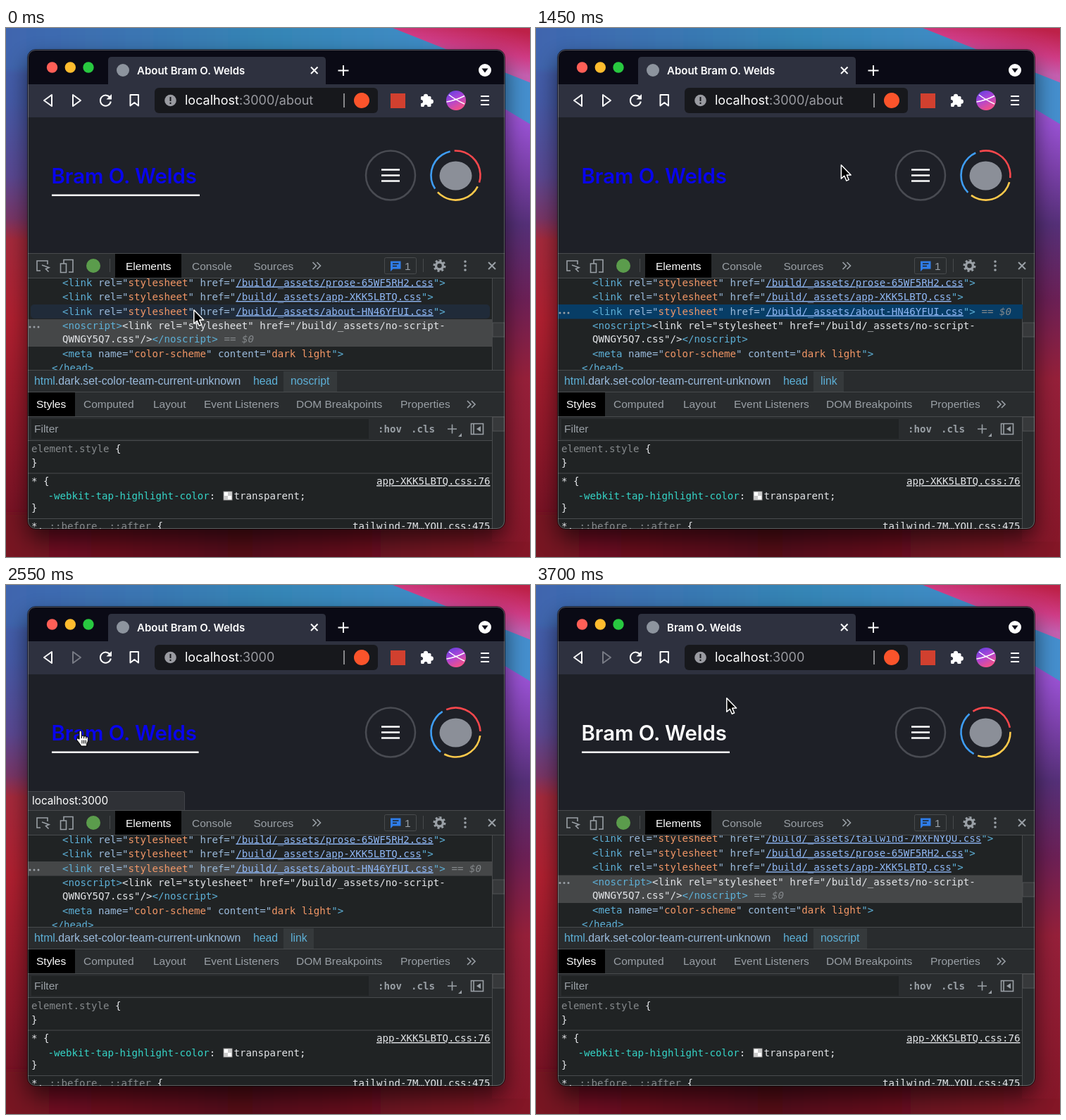
An HTML page for the animation above (3750 ms loop, 744x752 px).

```html
<!DOCTYPE html>
<html lang="en">
<head>
<meta charset="utf-8">
<title>Browser with devtools</title>
<style>
  html, body { margin: 0; width: 100%; height: 100%; overflow: hidden; background: #5a0d18; }
  svg { display: block; }
  text { white-space: pre; font-family: Inter, sans-serif; fill: #fff; }
  .dt text, text.dt { font: 15.5px "Liberation Sans", Arial, sans-serif; fill: #9aa0a6; }
  .dt text.on { fill: #fff; }
  .dt text.crumb { font-size: 15.8px; }
  text.m { font: 14.12px "DejaVu Sans Mono", monospace; fill: #e3e5e8; }
  .dt text.m { fill: #9aa0a6; font-weight: bold; }
  .tag { fill: #5db0d7; }
  .att { fill: #9bbbdc; }
  .val { fill: #f29766; }
  .url { fill: #8fb7f5; text-decoration: underline; }
  .dim { fill: #85898c; }
  text.it, .it { font-style: italic; }
  .prop { fill: #35d4c7; }
  .src { text-decoration: underline; text-anchor: end; }
  .line { fill: none; stroke: #fff; stroke-width: 2; }
  .grey { stroke: #9aa0a6; }
  .rule { stroke: #484b4d; fill: none; }
</style>
</head>
<body>
<svg width="744" height="752" viewBox="0 0 744 752">
  <defs>
    <linearGradient id="left" x2="0" y2="1">
      <stop stop-color="#4063ae"/><stop offset=".14" stop-color="#455aa6"/>
      <stop offset=".28" stop-color="#5a4892"/><stop offset=".36" stop-color="#793667"/>
      <stop offset=".4" stop-color="#a52a3c"/><stop offset=".55" stop-color="#b02030"/>
      <stop offset=".8" stop-color="#8c1729"/><stop offset="1" stop-color="#6a1022"/>
    </linearGradient>
    <linearGradient id="right" x2="0" y2="1">
      <stop stop-color="#a45ad8"/><stop offset=".06" stop-color="#9650cf"/>
      <stop offset=".16" stop-color="#7a40a8"/><stop offset=".28" stop-color="#553078"/>
      <stop offset=".45" stop-color="#6c2056"/><stop offset=".63" stop-color="#96203a"/>
      <stop offset="1" stop-color="#861729"/>
    </linearGradient>
    <linearGradient id="bottom">
      <stop stop-color="#7a1324"/><stop offset=".45" stop-color="#540d19"/><stop offset="1" stop-color="#861728"/>
    </linearGradient>
    <linearGradient id="top">
      <stop stop-color="#4063ae"/><stop offset=".5" stop-color="#3585b5"/><stop offset="1" stop-color="#4690d0"/>
    </linearGradient>
    <linearGradient id="pink" x1=".45" y1=".6" x2=".75" y2="0">
      <stop stop-color="#c460b0"/><stop offset=".4" stop-color="#cf3c86"/><stop offset="1" stop-color="#bd2148"/>
    </linearGradient>
    <linearGradient id="orb" x2=".5" y2="1">
      <stop stop-color="#5a3fe0"/><stop offset=".5" stop-color="#a945d8"/><stop offset="1" stop-color="#f0508c"/>
    </linearGradient>
    <filter id="soft" x="-.2" y="-.5" width="1.4" height="2"><feGaussianBlur stdDeviation="3"/></filter>
    <filter id="shadow" x="-.1" y="-.1" width="1.2" height="1.2"><feGaussianBlur stdDeviation="16"/></filter>
    <clipPath id="frame"><rect x="31" y="31" width="677" height="681" rx="11"/></clipPath>
    <clipPath id="tree"><rect x="31" y="356" width="660" height="130"/></clipPath>
  </defs>

  <!-- wallpaper -->
  <rect width="744" height="752" fill="url(#left)"/>
  <rect x="-20" y="690" width="784" height="80" fill="url(#bottom)" filter="url(#soft)"/>
  <path d="M-20-20H764V160H690V60H-20z" fill="url(#top)" filter="url(#soft)"/>
  <path d="M690 104L760 146V730H690z" fill="url(#right)"/>
  <path d="M544-2L750 80V-2z" fill="url(#pink)"/>
  <rect x="31" y="46" width="677" height="681" rx="12" opacity=".6" filter="url(#shadow)"/>

  <g clip-path="url(#frame)">
    <!-- tab strip -->
    <path fill="#0a0a15" d="M31 31H708V80H31z"/>
    <path fill="#2e313f" d="M145 80V46q0-5 5-5H449q5 0 5 5V80H708V127H31V80z"/>
    <circle cx="65.500" cy="56" r="7.700" fill="#ff5f57"/>
    <circle cx="91.300" cy="56" r="7.700" fill="#febc2e"/>
    <circle cx="117" cy="56" r="7.700" fill="#28c840"/>
    <circle cx="166" cy="60" r="9" fill="#8d949e"/>
    <g font-size="15" font-weight="600">
      <text data-at="0 2700" x="186" y="65.500">About Bram O. Welds</text>
      <text data-at="2700 3750" x="186" y="65.500">Bram O. Welds</text>
    </g>
    <path class="line" d="M433 55.500l9.500 9.500m0-9.500l-9.500 9.500M479 53v15m-7.500-7.500h15"/>
    <circle cx="680" cy="60" r="9" fill="#fff"/>
    <path d="M675.500 57.500h9l-4.500 6z" fill="#0a0a15"/>

    <!-- toolbar -->
    <g class="line" stroke-linejoin="round">
      <path d="M65 95V111L54 103z"/>
      <path id="forward" d="M95 95V111L106 103z"/>
      <path d="M148 99.500a7.500 7.500 0 1 0 .8 5M176.500 95h11.500v15.500l-5.700-4.500-5.800 4.500z"/>
      <path d="M674 97h12m-12 6h12m-12 6h12" stroke-width="1.800"/>
    </g>
    <path d="M150 94v7.500h-7.500z" fill="#fff"/>
    <rect x="211" y="85" width="317" height="36" rx="6" fill="#17181c"/>
    <circle cx="233.500" cy="103" r="8.300" fill="#9a9ba1"/>
    <path class="line" style="stroke:#17181c" d="M233.500 98v6m0 1.700v2.300"/>
    <text x="254" y="109" font-size="18">localhost<tspan fill="#9b9ca2">:3000<tspan data-at="0 2470">/about</tspan></tspan></text>
    <path d="M480 93v20" stroke="#c4c5c8" stroke-width="1.300"/>
    <circle cx="505" cy="103" r="11" fill="#fb542b"/>
    <rect x="546" y="93" width="21" height="21" fill="#d1402f"/>
    <g fill="#fff">
      <rect x="589" y="97" width="14.500" height="15" rx="1.500"/>
      <circle cx="596" cy="97" r="3.200"/><circle cx="603.700" cy="104.500" r="3.200"/>
    </g>
    <g fill="#2e313f"><circle cx="589.500" cy="104.500" r="2.500"/><circle cx="596" cy="111.500" r="2.500"/></g>
    <circle cx="639" cy="103" r="14" fill="url(#orb)"/>
    <path class="line" style="stroke-width:1.500" d="M625.500 105Q638 103 651 96.500M629 95q9 7 22 13"/>

    <!-- page -->
    <path fill="#1e2027" d="M31 127H708V321H31z"/>
    <text id="logo" x="64.500" y="221" font-size="29.300" font-weight="600">Bram O. Welds</text>
    <rect id="underline" y="236.500" height="2.500" fill="#fff"/>
    <circle cx="546" cy="209.500" r="35" class="line" style="stroke:#494b52;stroke-width:2.500"/>
    <path class="line" style="stroke-width:2.500" d="M533 201.500h26m-26 8h26m-26 8h26"/>
    <g id="ring" fill="none" stroke-width="2.600"></g>
    <ellipse cx="638.500" cy="210" rx="23" ry="20.500" fill="#8b8f98"/>
    <g data-at="2350 3280">
      <rect x="28" y="293.500" width="225.500" height="30" rx="3" fill="#2f3136" stroke="#424449"/>
      <text x="37" y="312" font-size="15.300">localhost:3000</text>
    </g>

    <!-- devtools bars -->
    <path fill="#202324" d="M31 320H708V712H31z"/>
    <path fill="#292c2e" d="M31 320H708V356H31zM31 487H708V587H31zM691 356h17v130h-17zM691 553h17v159h-17z"/>
    <path fill="#000" d="M155 321h94v34h-94zM31 518h67v34H31z"/>
    <path fill="#202324" d="M36 556H515v28H36z"/>
    <path class="rule" d="M31 320.500H708M31 355.500H708M31 486.500H708M31 517.500H708M31 552.500H708M31 586.500H691M690.500 356V486M690.500 553V712M147.500 328v19M592.500 328v19"/>
    <g class="dt" id="labels"></g>
    <g class="line grey" style="stroke-width:1.600">
      <path d="M49 345h-5v-14h15v5m-8 1l10 3.500-4.500 2 4 4"/>
      <path d="M82 335v-5.500h13V347h-6M77.500 335h8v12.500h-8z"/>
      <path d="M435.500 333l5 5-5 5m6-10l5 5-5 5M655 530l5 5-5 5m6-10l5 5-5 5"/>
      <path d="M685 333l10 10m0-10l-10 10" stroke-width="2"/>
      <path d="M633.500 563.500v13m-6.500-6.500h13M660.500 562.500h17v15h-17zM664 563v15"/>
      <circle cx="615.500" cy="338" r="5" stroke-width="3.500"/>
      <circle cx="615.500" cy="338" r="7.500" stroke-width="3" pathLength="16" stroke-dasharray="1"/>
    </g>
    <path fill="#9aa0a6" d="M674 566v8l-6-4zM647 576v5h-5z"/>
    <circle cx="124" cy="338" r="10" fill="#5b9c4c"/>
    <g fill="#9aa0a6"><circle cx="652" cy="332" r="1.800"/><circle cx="652" cy="338" r="1.800"/><circle cx="652" cy="344" r="1.800"/></g>
    <rect class="rule" x="537.500" y="326.500" width="45" height="23" rx="2"/>
    <path fill="#2f7de9" d="M546 331.500h14.500v11H549.500l-3.500 3.500z"/>
    <path d="M549 335h8.500m-8.500 3.500h6" stroke="#202324" stroke-width="1.500"/>

    <!-- element tree -->
    <g clip-path="url(#tree)">
      <rect data-at="0 160" x="35" y="393" width="652" height="20" rx="5" fill="#202b39"/>
      <path data-at="0 160" d="M31 414H691v39H31z" fill="#454748"/>
      <path data-at="160 2430" d="M31 393H691v20.500H31z" fill="#073d66"/>
      <path data-at="2430 3250" d="M31 393H691v20.500H31z" fill="#454748"/>
      <path data-at="3250 3750" d="M31 412.500H691v39.500H31z" fill="#454748"/>
      <g id="rows"></g>
    </g>
    <g fill="#37393b" stroke="#505355">
      <rect data-at="0 3250" x="691" y="419" width="17" height="20"/>
      <rect data-at="3250 3750" x="691" y="423" width="17" height="20"/>
      <rect data-at="0 2850 3250 3750" x="691" y="553" width="17" height="20"/>
    </g>

    <!-- styles -->
    <g data-at="0 2850 3250 3750">
      <path class="rule" d="M31 633H691M31 697.500H691"/>
      <text class="m" x="36" y="603"><tspan class="dim">element.style</tspan> {</text>
      <text class="m" x="36" y="623">}</text>
      <text class="m" x="36" y="649">* {</text>
      <text class="m src" x="687.500" y="649">app-XKK5LBTQ.css:76</text>
      <text class="m" x="59.500" y="669.500"><tspan class="prop">-webkit-tap-highlight-color</tspan>:</text>
      <rect x="309" y="659" width="12" height="12" fill="#fff" stroke="#888"/>
      <path d="M315 660h5v5h-5zM310 665h5v5h-5z" fill="#ccc"/>
      <text class="m" x="323.500" y="669.500">transparent;</text>
      <text class="m" x="36" y="687">}</text>
      <text class="m" x="36" y="713">*, <tspan class="dim">::before, ::after</tspan> {</text>
      <text class="m src" x="687.500" y="713">tailwind-7M…YQU.css:475</text>
    </g>
    <g data-at="2850 3250">
      <path class="rule" d="M31 622.500H691"/>
      <text class="dt it" x="360" y="609" text-anchor="middle">No matching selector or style</text>
    </g>
  </g>
  <g fill="none">
    <rect x="30.500" y="30.500" width="678" height="682" rx="11.500" stroke="#000" stroke-opacity=".6"/>
    <rect x="31.500" y="31.500" width="676" height="680" rx="10.500" stroke="#fff" stroke-opacity=".28"/>
  </g>

  <g id="cursor" stroke-linejoin="round">
    <path data-at="0 2300 2780 3750" d="M.8 .8V20.300L5.300 16.300 8.300 23.300 11.600 21.800 8.700 15.100H14.600z" fill="#000" stroke="#fff" stroke-width="1.500"/>
    <g data-at="2300 2780" stroke="#000" stroke-width="1.100">
      <path fill="#fff" d="M0 11V1Q0-1 1.700-1T3.400 1V7Q5 5 6.600 7.200 8.600 5.800 9.800 8 12.600 7 12.700 10.500 13 15 10.700 18V21H2.800Q0 16.500-3.500 12.500-4.500 10-2 9.700z"/>
      <path d="M4 12.500v5m2.600-5v5m2.600-5v5M3.400 7v3m3.200-2.800v3m3.200-2.200v2.500"/>
    </g>
  </g>
</svg>
<script>
const LOOP = 3750, BLUR = 160, HOVER = 2302, RELOAD = 3250;
const $ = id => document.getElementById(id);
const span = (cls, s) => `<tspan class="${cls}">${s.replace(/</g, '&lt;')}</tspan>`;
const label = (x, y, s, cls = '') => `<text class="${cls}" x="${x}" y="${y}">${s}</text>`;
const line = (x, y, ...parts) => label(x, y, parts.join(''), 'm');
const during = (at, s) => `<g data-at="${at}">${s}</g>`;
const dots = y => [34, 40, 46].map(x => `<circle cx="${x}" cy="${y}" r="1.500" fill="#9aa0a6"/>`).join('');

// Element tree
const link = (y, file) => line(80, y, span('tag', '<link'), span('att', ' rel="'), span('val', 'stylesheet'),
  span('att', '" href="'), span('url', `/build/_assets/${file}.css`), span('tag', '">'));
const marker = (x, y) => line(x, y, span('dim', '== '), span('dim it', '$0'));
const tree = (y, files) => files.map((f, i) => link(y + 20.5 * i, f)).join('') +
  line(80, y + 61.5, span('tag', '<noscript>'), '&lt;link rel="stylesheet" href="/build/_assets/no-script-') +
  line(80, y + 80.5, 'QWNGY5Q7.css"/>', span('tag', '</noscript>')) +
  line(80, y + 101.5, span('tag', '<meta'), span('att', ' name="'), span('val', 'color-scheme'),
    span('att', '" content="'), span('val', 'dark light'), span('tag', '">')) +
  line(65, y + 121.5, span('tag', '</head>'));
const prose = 'prose-65WF5RH2', app = 'app-XKK5LBTQ';
$('rows').innerHTML =
  during(`0 ${RELOAD}`, tree(366.5, [prose, app, 'about-HN46YFUI'])) +
  during(`${RELOAD} ${LOOP}`, tree(365.3, ['tailwind-7MXFNYQU', prose, app]) + marker(309.5, 445.8) + dots(423.5)) +
  during(`0 ${BLUR}`, marker(309.5, 447) + dots(425)) +
  during(`${BLUR} ${RELOAD}`, marker(632.5, 407.5) + dots(405));

// Devtools labels
const crumb = (x, s) => label(x, 507, s, 'crumb');
const lastCrumb = (width, name) =>
  `<path fill="#35393b" d="M394 488h${width}v29h-${width}z"/>` + crumb(404, span('tag', name));
$('labels').innerHTML =
  label(170, 343.5, 'Elements', 'on') + label(264, 343.5, 'Console') +
  label(351.5, 343.5, 'Sources') + label(566, 343.5, '1') +
  [[110, 'Computed'], [209, 'Layout'], [281, 'Event Listeners'], [412, 'DOM Breakpoints'], [560, 'Properties']]
    .map(([x, s]) => label(x, 540, s)).join('') +
  label(43, 540, 'Styles', 'on') + label(40, 575, 'Filter') + line(528, 575, ':hov') + line(575, 575, '.cls') +
  crumb(40, span('tag', 'html') + span('att', '.dark.set-color-team-current-unknown')) +
  crumb(351, span('tag', 'head')) +
  during(`0 ${BLUR} ${RELOAD} ${LOOP}`, lastCrumb(76, 'noscript')) +
  during(`${BLUR} ${RELOAD}`, lastCrumb(43, 'link'));

$('ring').innerHTML = ['#f8474c', '#fdc94b', '#3e9df5'].map((color, i) =>
  `<circle cx="638.5" cy="209.5" r="35" stroke="${color}" pathLength="360" stroke-dasharray="110 250"
    transform="rotate(${267 + 120 * i} 638.5 209.5)"/>`).join('');

// Pointer path: time, x, y
const path = [[0, 266, 400], [180, 251, 397], [700, 251, 397], [1050, 360, 330], [1330, 453, 228], [1450, 433, 194],
  [1800, 240, 172], [2150, 106, 174], [2200, 106, 174], [2400, 104, 208], [2640, 104, 208], [2950, 270, 160], [LOOP, 270, 160]];
const slope = (i, k) => {
  const a = path[i - 1], b = path[i], c = path[i + 1];
  if (!a || !c || (a[1] === b[1] && a[2] === b[2]) || (b[1] === c[1] && b[2] === c[2])) return 0;
  return (c[k] - a[k]) / (c[0] - a[0]);
};
function pointer(t) {
  const i = path.findIndex((p, n) => n && t <= p[0]) - 1;
  const a = path[i], b = path[i + 1], d = b[0] - a[0], u = (t - a[0]) / d;
  return [1, 2].map(k => a[k] + (b[k] - a[k]) * u * u * (3 - 2 * u) +
    d * u * (1 - u) * (slope(i, k) * (1 - u) - slope(i + 1, k) * u));
}

const timed = [...document.querySelectorAll('[data-at]')].map(el => [el, el.dataset.at.split(' ').map(Number)]);
const easeIn = p => Math.min(1, Math.max(0, p)) ** 1.7;

function draw(t) {
  for (const [el, at] of timed)
    el.style.display = at.filter(v => v <= t).length % 2 ? '' : 'none';
  $('cursor').setAttribute('transform', `translate(${pointer(t)})`);
  $('ring').setAttribute('transform', `rotate(${-0.0076 * t} 638.5 209.5)`);
  $('forward').style.stroke = t < 2470 ? '#fff' : '#777a84';
  $('logo').style.fill = t < 2700 ? '#0804ee' : '#fff';
  const entering = t >= HOVER;
  const width = 210 * (entering ? easeIn((t - HOVER) / 250) : 1 - easeIn((t - BLUR) / 250));
  $('underline').setAttribute('x', entering ? 65 : 275 - width);
  $('underline').setAttribute('width', width);
}

const start = performance.now();
(function tick() {
  draw((performance.now() - start) % LOOP);
  requestAnimationFrame(tick);
})();
</script>
</body>
</html>
```
